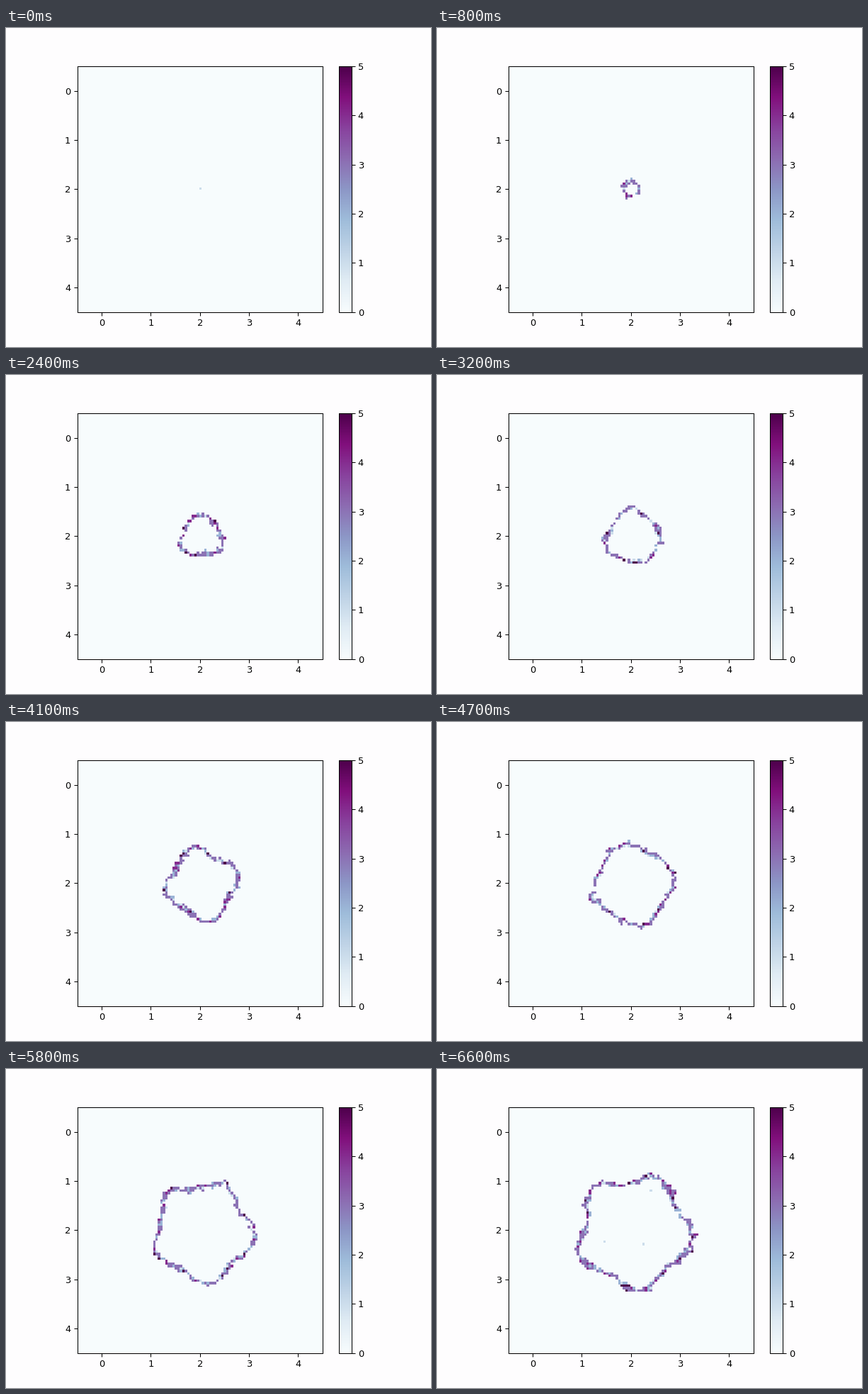
Animation, 600 px wide and 450 px high, one loop 6.7 s. Source, as a matplotlib script:

```python
import numpy as np
import matplotlib.pyplot as plt
from matplotlib.animation import FuncAnimation

FRAMES, STEP = 67, 100
N = 101                                   # cells per side
SPEED = 0.0033                            # cells per ms
DRIFT = 0.07                              # the ring grows faster down and right

# Lobes of the ring: count, angle of one peak, strength, time of full strength
LOBES = [(3, 30, 0.14, 2700), (4, -15, 0.12, 4200), (5, 10, 0.10, 5600)]
PEAKS = [lobe[-1] for lobe in LOBES]

rng = np.random.default_rng(7)
noise = rng.uniform(-1, 1, (N, N))
clumps = sum(np.roll(noise, (i, j), (0, 1)) for i in (-1, 0, 1) for j in (-1, 0, 1))
rough = 0.25 * clumps + 0.4 * noise
fresh = rng.choice([5, 4, 4, 3, 3, 3, 3, 3, 3, 3, 2], (N, N))
fading = rng.choice([3, 3, 3, 2, 2, 1], (N, N))

y, x = np.mgrid[:N, :N] - N // 2
dist = np.hypot(x, y)
angle = np.arctan2(y, x)


def front(theta, t):
    """Radius of the ring in cells; it gains lobes as it grows."""
    shape = 1 + DRIFT * np.cos(theta - np.pi / 4)
    for k, (n, peak, strength, _) in enumerate(LOBES):
        weight = np.interp(t, PEAKS, np.eye(len(LOBES))[k])
        shape = shape + weight * strength * np.cos(n * (theta - np.radians(peak)))
    return (0.2 + SPEED * t) * shape


def cells(i):
    grid = np.zeros((N, N))
    if i == 0:
        grid[N // 2, N // 2] = 1
        return grid
    t = i * STEP
    r = front(angle, t)
    slope = (front(angle + 0.05, t) - front(angle - 0.05, t)) / 0.1
    gap = (r - dist) / np.hypot(1, slope / r)
    depth = gap + 0.75 + rough
    ring = (depth > 0) & (depth < 1.5)
    grid[ring] = np.where(depth < 0.9, fresh, fading)[ring]

    # a few faint cells flare up inside the grown ring
    if t > 4500:
        spark = np.random.default_rng(i).random((N, N)) < 0.0015
        grid[spark & (gap > 2)] = 1
    return grid


fig, ax = plt.subplots(figsize=(6.4, 4.8), dpi=93.75, facecolor="#fefdfe")
image = ax.imshow(cells(0), cmap="BuPu", vmin=0, vmax=5,
                  extent=(-0.5, 4.5, 4.5, -0.5), interpolation="nearest")
fig.colorbar(image)


def update(i):
    image.set_data(cells(i))
    return [image]


anim = FuncAnimation(fig, update, frames=FRAMES, interval=STEP,
                     repeat=True, repeat_delay=0)
plt.show()
```
